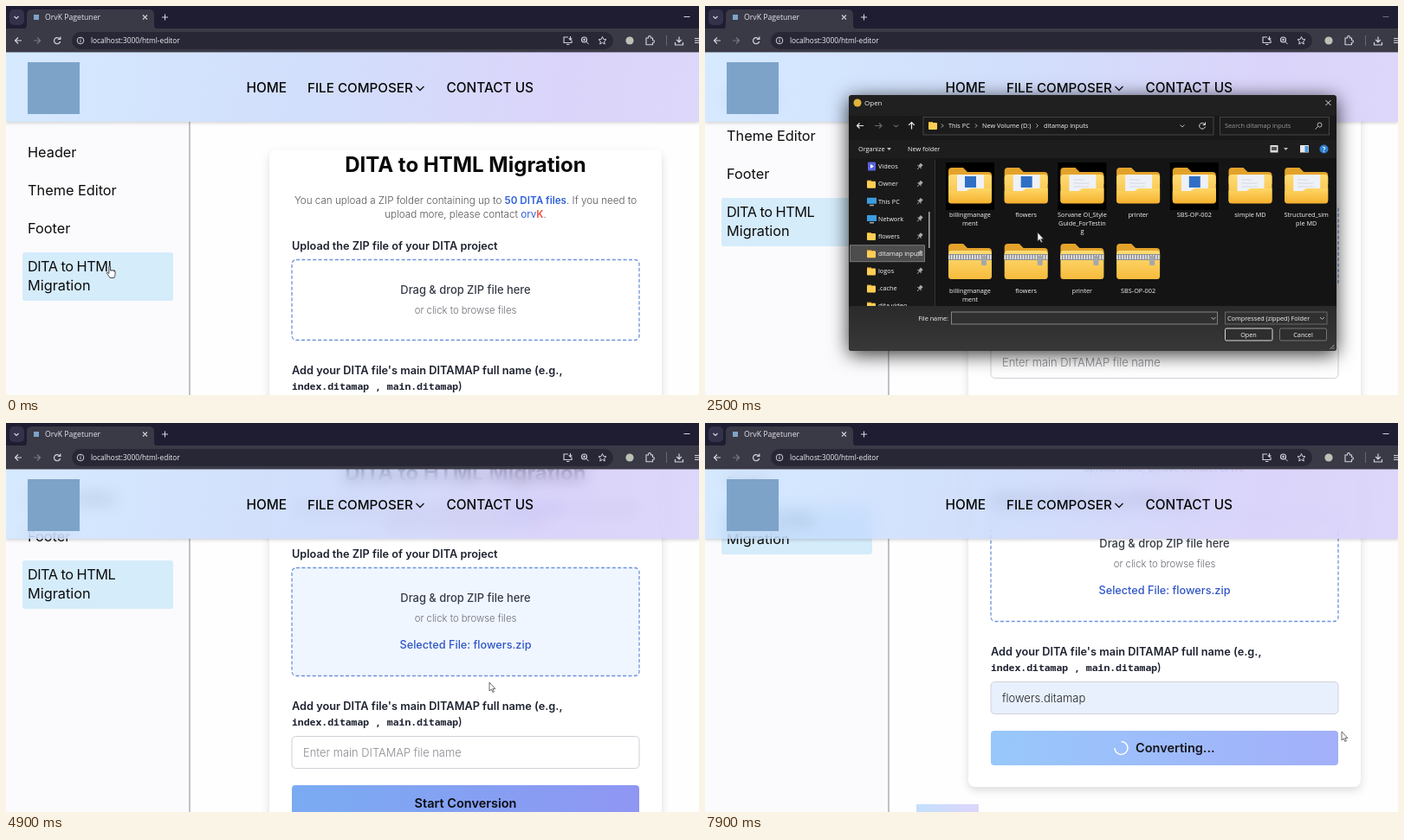
An HTML page for the animation above (8 s loop, 800 by 450 pixels).

```html
<!DOCTYPE html>
<html lang="en">
<head>
<meta charset="utf-8">
<title>DITA to HTML Migration</title>
<style>
html, body { margin: 0; width: 100%; height: 100%; overflow: hidden; background: #fefefe; }
svg, #nav { position: absolute; left: 0; top: 0; width: 800px; height: 450px; }
text { font-family: Inter, "Open Sans", sans-serif; white-space: pre; }
.ui text { font-family: "Open Sans", "Noto Sans", sans-serif; }
#nav {
  top: 53px; height: 81px; box-shadow: 0 1px 4px #0003;
  background: linear-gradient(100deg, rgba(196,224,255,.7), rgba(190,208,250,.7) 45%, rgba(204,194,248,.7) 80%, rgba(206,198,248,.7));
  backdrop-filter: blur(9px);
}
#card { filter: drop-shadow(0 4px 5px #0002); }
</style>
</head>
<body>
<svg id="page"></svg>
<div id="nav"></div>
<svg id="top"></svg>
<script>
const $ = id => document.getElementById(id);
const text = (x, y, s, size, weight = 400, fill = '#111', more = '') =>
  `<text x="${x}" y="${y}" font-size="${size}" font-weight="${weight}" fill="${fill}" ${more}>${s}</text>`;
const mid = (y, s, size, weight, fill, more = '') =>
  text(530.5, y, s, size, weight, fill, 'text-anchor="middle" ' + more);
const rect = (x, y, w, h, fill, more = '') =>
  `<rect x="${x}" y="${y}" width="${w}" height="${h}" fill="${fill}" ${more}/>`;
const line = (d, color, width = 1.2, more = '') =>
  `<path d="${d}" fill="none" stroke="${color}" stroke-width="${width}" ${more}/>`;
const circle = (x, y, r, fill, more = '') => `<circle cx="${x}" cy="${y}" r="${r}" fill="${fill}" ${more}/>`;
const grad = (id, a, b, vertical) =>
  `<linearGradient id="${id}" ${vertical ? 'x2="0" y2="1"' : ''}><stop stop-color="${a}"/><stop offset="1" stop-color="${b}"/></linearGradient>`;

// Web page
const mono = 'style="font-family:\'Noto Sans Mono\',\'DejaVu Sans Mono\',monospace"';
const brand = '<tspan fill="#2f62d9" font-weight="400">orv</tspan><tspan fill="#e8533f" font-weight="600">K</tspan>';

const sidebar = rect(0, 134, 212, 320, '#fbfbfd') + line('M212 134V450', '#9a9aa2', 1.2) +
  `<g id="side">${rect(19, 285, 174, 56, '#d5ecfb', 'rx="3"')}` +
  [['Header', 175], ['Theme Editor', 219], ['Footer', 263], ['Migration', 329]]
    .map(([s, y]) => text(25, y, s, 16.3, 400, '#0c0c0c')).join('') +
  text(25, 307, 'DITA to HTML', 16.3, 400, '#0c0c0c', 'letter-spacing="-.5"') + '</g>';

const form =
  rect(304, 166, 453, 412, '#fff', 'id="card" rx="8"') +
  mid(192, 'DITA to HTML Migration', 24, 700, '#080808') +
  mid(228.5, 'You can upload a ZIP folder containing up to <tspan font-weight="600" fill="#2f62d9">50 DITA files</tspan>. If you need to', 11.65, 300, '#555') +
  mid(244.5, `upload more, please contact ${brand}.`, 11.65, 300, '#555') +
  text(330, 281.5, 'Upload the ZIP file of your DITA project', 12.7, 600, '#1d2230') +
  rect(330, 293.5, 401, 93, '#fff', 'id="drop" rx="5" stroke="#6d93dc" stroke-width="1.3" stroke-dasharray="4 2.4"') +
  mid(333, 'Drag &amp; drop ZIP file here', 12.9, 500, '#363b47') +
  mid(356, 'or click to browse files', 11.3, 300, '#6c6c74') +
  `<g id="chosen">${rect(455, 373, 0, 19, '#b9b9b9', 'id="grey"')}` +
  mid(386.5, 'Selected File: flowers.zip', 12.7, 500, '#2f55c8', 'id="file"') + '</g>' +
  '<g id="low">' +
  text(330, 425.5, "Add your DITA file's main DITAMAP full name (e.g.,", 12.75, 600, '#1d2230') +
  text(330, 444, 'index.ditamap , main.ditamap', 11.45, 600, '#1d2230', mono) +
  text(522, 444, ')', 12.7, 500, '#1d2230') +
  rect(330, 456.5, 401, 37, '#fff', 'id="input" rx="4.5"') +
  text(343, 479.5, 'Enter main DITAMAP file name', 12.9, 300, '#8a8a92', 'id="hint"') +
  `<g id="value">${text(343, 479.5, 'flowers.ditamap', 13, 300, '#222')}
    <g clip-path="url(#marked)">${rect(342, 466, 102, 19, '#2f62c4')}${text(343, 479.5, 'flowers.ditamap', 13, 300, '#fff')}</g>
    ${line('M343 483.5' + 'q1 -1.6 2 0t2 0'.repeat(25), '#d8485a', .9, 'id="squiggle"')}</g>` +
  rect(330, 513, 401, 40, 'url(#blue)', 'id="button" rx="4"') +
  mid(538.5, 'Start Conversion', 14.5, 600, '#0c0c12', 'id="start"') +
  '<g id="busy">' + text(497, 538, 'Converting...', 14.5, 600, '#15151c') +
  line('M480.5 525.5a7.5 7.5 0 1 1 -7.5 7.5', '#fff', 1.5, 'id="spin"') + '</g>' +
  rect(244, 598, 72, 60, 'url(#foot)') + '</g>';

$('page').innerHTML = `<defs>${grad('blue', '#7aabf2', '#8f96f3')}${grad('pale', '#98c8fb', '#a3affa')}
  ${grad('foot', '#c4dffc', '#dcd6fc')}<clipPath id="marked">${rect(342, 460, 0, 30, '#000', 'id="mark"')}</clipPath></defs>
  ${sidebar}<g id="main">${form}</g>`;

// Site header and browser bar
const header = rect(25, 65, 60, 60, '#7da3c9') +
  text(277.5, 99.5, 'HOME', 15.4, 500, '#080808') + text(348, 99.5, 'FILE COMPOSER', 15.2, 500, '#080808') +
  text(508.5, 99.5, 'CONTACT US', 15.4, 500, '#080808') + line('M473.500 93l4.500 4.500 4.500 -4.500', '#111', 1.3);

const ink = '#d4d3dc';
const browser = '<g class="ui">' + rect(0, 0, 800, 27, '#1f1d31') + rect(0, 26, 800, 27.5, '#3a3946') +
  rect(4, 4, 17, 18, '#34324a', 'rx="5"') + line('M9.500 12l2.500 2.500 2.500 -2.500', ink) +
  '<path d="M19 27q5 0 5-5v-12q0-6 6-6h135q6 0 6 6v12q0 5 5 5z" fill="#3a3946"/>' +
  rect(32, 10, 6, 6, '#7da3c9') + text(45, 16.3, 'OrvK Pagetuner', 8.7, 500, '#e6e5ec') +
  line('M158 10.500l5 5m0 -5l-5 5M183.500 9.500v7m-3.500 -3.500h7', ink, 1.1) +
  line('M782.500 12.500h7', ink, 1, 'id="min"') +
  line('M18 40h-7.500m3.500 -3.500l-3.500 3.500 3.500 3.500', ink) +
  line('M32 40h7.500m-3.500 -3.500l3.500 3.500 -3.500 3.500', '#77768a') +
  line('M62 38a3.600 3.600 0 1 0 .6 3M62.800 35.500v3h-3', ink) +
  rect(76, 30, 625, 20, '#282736', 'rx="10"') +
  circle(86, 40, 3.8, 'none', `stroke="${ink}"`) + line('M86 39.300v2.700M86 37.500v1', ink, 1) +
  text(98, 43, 'localhost:3000/html-editor', 8.3, 500, '#f0eff4') +
  line('M649 36h-5v6.500h9v-3M647 44.500h3.500M651.500 35v4m-1.800 -1.700l1.800 1.800 1.800 -1.800', ink, 1.1) +
  circle(667.5, 39, 3, 'none', `stroke="${ink}" stroke-width="1.2"`) + line('M669.700 41.200l3 3M666 39h3M667.500 37.500v3', ink, 1) +
  line('M688.500 35.500l1.300 3 3.200 .3 -2.400 2.100 .7 3.200 -2.800 -1.700 -2.800 1.700 .7 -3.200 -2.400 -2.100 3.200 -.3z', ink, 1) +
  circle(720, 40, 4.6, '#b9c2b4') +
  line('M739 37h2.500q0 -2.500 1.500 -2.500t1.500 2.500h2v2.500q2 0 2 1.500t-2 1.500v2.200h-7.500z', ink, 1.1) +
  line('M762.500 34v12', '#66657a', 1) +
  line('M777 35.500v6m-2.800 -2.500l2.800 2.800 2.800 -2.800M772.500 42v3h9v-3', ink, 1.2) +
  line('M795 37.500h6M795 40h6M795 42.500h6', ink, 1) + '</g>';

// File dialog
const label = (x, y, s, fill = '#f6f6f6', more = '') => text(x, y, s, 7.3, 500, fill, more);
const paper = kind => rect(-15, 8, 31, 20, '#eef1f7', 'rx="1.500"') +
  (kind == 'logo' ? rect(-6, 10, 13, 13, '#2f6fc4') : line('M-10 14h12M-10 18h18M-10 22h18', '#d3d8e2', 1));
const zipper = line('M-25 15.500h50', '#8d8f93', 7) +
  line('M-25 15.500h50', '#eceded', 5, 'stroke-dasharray="1.500 1.500"') + rect(13, 14, 6, 11, '#a4a7ab', 'rx="1.500"');
const folder = (x, y, kind) => `<g transform="translate(${x} ${y})">` +
  '<path d="M-25 4q0-4 4-4h13l5 5h24q4 0 4 4v10h-50z" fill="#e3a32b"/>' +
  rect(-25, 8, 50, 33, 'url(#gold)', 'rx="3.500"') +
  (kind == 'zip' ? zipper : paper(kind) +
    '<path d="M-25 27h21l4-3h25v14q0 3.500-3.500 3.500h-43q-3.500 0-3.500-3.500z" fill="url(#front)"/>') + '</g>';
const mini = (x, y) => rect(x, y - 4, 5, 3, '#e3a32b') + rect(x, y - 3, 10, 8, '#ffce54', 'rx="1"');

const columns = x => 306 + x * 64.7;
const rows = [
  [187, [['logo', 'billingmanage', 'ment'], ['logo', 'flowers'], ['doc', 'Sorvane OI_Style', 'Guide_ForTestin', 'g'],
    ['doc', 'printer'], ['logo', 'SBS-OP-002'], ['doc', 'simple MD'], ['doc', 'Structured_sim', 'ple MD']]],
  [275, [['zip', 'billingmanage', 'ment'], ['zip', 'flowers'], ['zip', 'printer'], ['zip', 'SBS-OP-002']]]
];
const files = rows.map(([y, list]) => list.map(([kind, ...names], i) =>
  (y < 200 && i % 2 == 0 && i < 5 ? rect(columns(i) - 28, y - 6, 56, 55, '#000') : '') + folder(columns(i), y, kind) +
  names.map((s, n) => label(columns(i), y + 57 + n * 9.6, s, '#f6f6f6', 'text-anchor="middle"')).join('')).join('')).join('');

const places = ['Videos', 'Owner', 'This PC', 'Network', 'flowers', 'ditamap inputs', 'logos', '.cache', 'dita video'].map((s, i) => {
  const y = 185.5 + i * 20.15;
  return (i == 5 ? rect(167.5, y - 9.5, 86, 19, '#4d4d4d', 'stroke="#8a8a8a" stroke-width=".8"') : '') +
    (i == 0 ? rect(188, y - 5, 9, 10, '#5a63e0', 'rx="1"') + `<path d="M191 ${y - 2.5}l4 2.500 -4 2.500z" fill="#fff"/>`
      : i == 2 || i == 3 ? rect(187, y - 4, 11, 7, '#3c9be0') + rect(190, y + 4, 5, 1.5, '#aaa') : mini(187, y)) +
    label(200, y + 2.7, s) +
    (i < 8 ? `<g transform="translate(248 ${y}) rotate(40)">${rect(-1.8, -3.5, 3.6, 4, '#aaa')}${line('M-3 .8h6M0 1v3.500', '#aaa', .9)}</g>` : '');
}).join('');

const dialog = `<defs>${grad('gold', '#ffdc74', '#f6bb3c', 1)}${grad('front', '#ffd765', '#f3b02f', 1)}${grad('base', '#2a2a2a', '#383838', 1)}
  <clipPath id="list">${rect(166, 176, 100, 171, '#000')}</clipPath></defs>` +
  '<g id="dialog" class="ui">' +
  rect(166, 103, 563, 296, '#191919', 'rx="4" style="filter:drop-shadow(0 4px 11px #000c)"') +
  rect(166, 103, 563, 24, '#202020', 'rx="4"') + rect(166, 155, 563, 21, '#1d1d1d') + rect(266, 176, 463, 171, '#141414') +
  circle(176, 112, 4.5, '#e0b33c') + text(184, 115, 'Open', 8, 500, '#f6f6f6') +
  line('M716.500 109l6 6m0 -6l-6 6', '#ddd', 1) +
  line('M183 138.500h-7.500m3 -3l-3 3 3 3', '#eee') + line('M196 138.500h8m-3 -3l3 3 -3 3', '#666') +
  line('M218 137.500l2.500 2.500 2.500 -2.500', '#999', 1) + line('M238.500 142.500v-8m-3.300 3.300l3.300 -3.300 3.300 3.300', '#eee') +
  rect(252, 128.5, 335, 20.5, '#1b1b1b', 'stroke="#4a4a4a" stroke-width=".9"') +
  rect(594.5, 128.5, 126, 20.5, '#1b1b1b', 'stroke="#4a4a4a" stroke-width=".9"') + mini(258, 138) +
  label(281, 141.3, 'This PC') + label(320, 141.3, 'New Volume (D:)') + label(391, 141.3, 'ditamap inputs') +
  line('M273 136.500l2 2 -2 2M312 136.500l2 2 -2 2M382.500 136.500l2 2 -2 2M548.500 137.500l2.500 2.500 2.500 -2.500', '#bbb', 1) +
  line('M577 137a3.400 3.400 0 1 0 .4 2.500M577.500 134.500v3h-3', '#ddd', 1) +
  label(600, 141.3, 'Search ditamap inputs', '#999') + circle(709.5, 137.5, 2.5, 'none', 'stroke="#bbb"') + line('M707.500 139.500l-3 3', '#bbb', 1) +
  label(177, 168, 'Organize') + '<path d="M210 164h5l-2.500 3zM668 164h5l-2.500 3z" fill="#bbb"/>' + label(234, 168, 'New folder') +
  rect(652.5, 161, 9, 8.5, '#ddd') + rect(654, 163, 6, 4, '#555') +
  rect(687, 161, 10, 8.5, '#e8e8e8') + rect(692.5, 162, 4, 7, '#4b9be0') +
  circle(714.5, 165.5, 5, '#2f7fd0') + text(712.7, 168.5, '?', 8, 600, '#fff') +
  `<g clip-path="url(#list)">${places}</g>` + rect(258, 238, 1.6, 42, '#a0a0a0') + line('M265.500 178V347', '#333', 1) + files +
  rect(166, 347, 563, 52, 'url(#base)', 'rx="3"') +
  label(281, 363.5, 'File name:', '#f6f6f6', 'text-anchor="end"') +
  rect(284.5, 354, 307, 14, '#303030', 'stroke="#9a9a9a" stroke-width=".8"') +
  rect(600.5, 354, 117.5, 14, '#303030', 'stroke="#777" stroke-width=".8"') + label(603, 363.5, 'Compressed (zipped) Folder') +
  line('M584.500 360l2.500 2.500 2.500 -2.500M710 360l2.500 2.500 2.500 -2.500', '#bbb', 1) +
  rect(600.5, 373, 54.5, 14, '#2e2e2e', 'rx="1.500" stroke="#ddd"') + rect(663.5, 373, 54, 14, '#2e2e2e', 'rx="1.500" stroke="#888" stroke-width=".8"') +
  label(627.5, 382.7, 'Open', '#f6f6f6', 'text-anchor="middle"') + label(690.5, 382.7, 'Cancel', '#f6f6f6', 'text-anchor="middle"') +
  line('M721.500 397l5 -5M724.500 397l2 -2', '#aaa', 1) + '</g>';

const cursor = '<g id="cursor">' +
  '<path id="arrow" d="M0 0v10l2.300 -2 1.600 3.500 1.500 -.7 -1.600 -3.400h3z" fill="#fff" stroke="#444" stroke-width=".8"/>' +
  '<path id="hand" d="M0 0q1.300 -.8 1.600 .6v4.300q3 -.3 5.400 1v3.500q0 2 -1.200 4.100h-4.600l-3.600 -5q-.8 -1.600 .6 -1.400l1.600 1.500z" fill="#fff" stroke="#222" stroke-width=".8"/>' +
  line('M-2 -5q2 0 2 1v8q0 1 -2 1M2 -5q-2 0 -2 1v8q0 1 2 1', '#555', .9, 'id="beam"') + '</g>';

$('top').innerHTML = header + browser + dialog + cursor;

// Motion
const ramp = (t, a, b) => {
  const u = Math.min(1, Math.max(0, (t - a) / (b - a)));
  return u * u * (3 - 2 * u);
};
const trail = [
  [0, 119, 301], [350, 119, 301], [1000, 388, 199], [1200, 388, 199], [1750, 480, 270], [2150, 480, 270], [2500, 384, 262],
  [2750, 372, 297], [2950, 372, 297], [3100, 456, 319], [3350, 608, 320], [3500, 759, 305], [3900, 759, 305], [4700, 558, 300],
  [4950, 558, 300], [5250, 420, 381], [5700, 420, 381], [5850, 446, 382], [6150, 335.5, 384], [6450, 335.5, 384],
  [6950, 560, 372], [7250, 560, 372], [7750, 735, 357], [8000, 735, 357]
];
function place(t) {
  const i = trail.findIndex(p => p[0] > t), [t0, x0, y0] = trail[i - 1], [t1, x1, y1] = trail[i];
  const u = ramp(t, t0, t1);
  return [x0 + (x1 - x0) * u, y0 + (y1 - y0) * u];
}
const within = (t, a, b) => t >= a && t < b;
const show = (id, on) => $(id).style.display = on ? '' : 'none';
const set = (id, attrs) => { for (const k in attrs) $(id).setAttribute(k, attrs[k]); };

function draw(t) {
  const scroll = 63 * (ramp(t, 1350, 1550) + ramp(t, 3850, 4050) + ramp(t, 6550, 6750));
  const chosen = t >= 2900, extra = chosen ? 32 : 0;
  set('side', { transform: `translate(0 ${-scroll})` });
  set('main', { transform: `translate(0 ${-scroll})` });
  set('low', { transform: `translate(0 ${extra})` });
  set('card', { height: 412 + extra });

  const tint = chosen ? 1 - ramp(t, 4900, 5300) : 0;
  set('drop', { height: 93 + extra, fill: `rgb(${255 - 15 * tint},${255 - 9 * tint},255)` });
  show('chosen', chosen);
  const picked = within(t, 3100, 3800);
  set('grey', { width: picked ? 151.5 * ramp(t, 3100, 3350) : 0 });
  set('file', { fill: picked ? '#33363d' : '#2f55c8' });

  const filled = t >= 5500, focus = within(t, 5250, 7150), busy = t >= 7150;
  set('input', { fill: filled ? '#e8f0fe' : '#fff', stroke: focus ? '#15171f' : '#cfd1d8', 'stroke-width': focus ? 1.4 : 1 });
  show('hint', !filled);
  show('value', filled);
  const marked = within(t, 5850, 6450) ? 102 * ramp(t, 5850, 6150) : 0;
  set('mark', { x: 444 - marked, width: marked });
  show('squiggle', focus);

  set('button', { fill: busy ? 'url(#pale)' : 'url(#blue)' });
  show('start', !busy);
  show('busy', busy);
  set('spin', { transform: `rotate(${(t - 7900) * .36} 480.5 533)` });

  const open = within(t, 2050, 2900);
  show('dialog', open);
  set('min', { opacity: open ? .45 : 1 });

  const [x, y] = place(t);
  const hand = t < 450 || within(t, 1550, 2050) || within(t, 6850, 7450);
  const beam = within(t, 3080, 3380) || within(t, 5180, 6550);
  set('cursor', { transform: `translate(${x} ${y})` });
  show('hand', hand);
  show('beam', beam);
  show('arrow', !hand && !beam);
}

const begin = performance.now();
function tick() {
  draw((performance.now() - begin) % 8000);
  requestAnimationFrame(tick);
}
tick();
</script>
</body>
</html>
```
